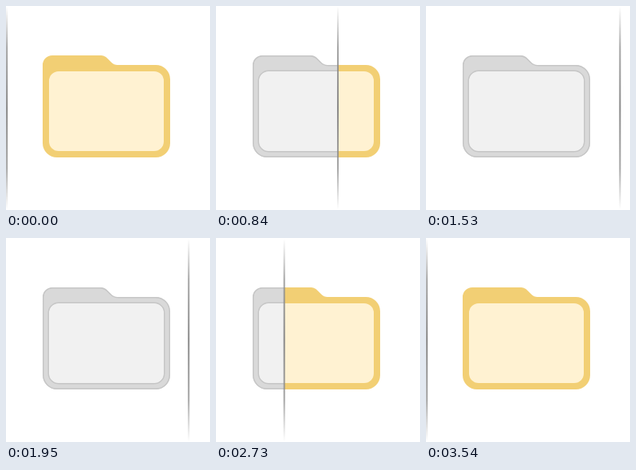
Animation of 256x256 px, one loop 3600 ms. Source, as an HTML page:

```html
<!DOCTYPE html>
<html lang="en">
<head>
<meta charset="utf-8">
<title>Folder wipe</title>
<style>
  @property --x {
    syntax: "<length>";
    inherits: true;
    initial-value: 1px;
  }
  html, body {
    margin: 0;
    width: 100%;
    height: 100%;
    overflow: hidden;
    background: #fff;
  }
  .stage {
    position: relative;
    width: 256px;
    height: 256px;
    animation: sweep 3600ms infinite;
  }
  svg {
    position: absolute;
    inset: 0;
    width: 256px;
    height: 256px;
  }
  .grey {
    background: #fff;
    clip-path: inset(0 calc(256px - var(--x)) 0 0);
  }
  .line { transform: translateX(var(--x)); }

  /* Linear start, soft landing in both directions */
  @keyframes sweep {
    0%      { --x: 1px;   animation-timing-function: cubic-bezier(.167, .167, .667, 1); }
    50%     { --x: 255px; animation-timing-function: cubic-bezier(.167, .167, .667, 1); }
    99.167% { --x: 1px; }
    100%    { --x: 1px; }
  }
</style>
</head>
<body>
<div class="stage">
  <svg viewBox="0 0 256 256">
    <defs>
      <path id="folder" d="M46 74a12 12 0 0 1 12-12H118c4.500 0 6.500 1 9.500 4l4 4c3 3 5 4 9.500 4H188a18 18 0 0 1 18 18V172a18 18 0 0 1-18 18H64a18 18 0 0 1-18-18Z"/>
      <clipPath id="edge"><use href="#folder"/></clipPath>
      <linearGradient id="fade" x2="0" y2="1">
        <stop offset="0" stop-color="#888" stop-opacity="0"/>
        <stop offset=".2" stop-color="#888" stop-opacity=".75"/>
        <stop offset=".5" stop-color="#888"/>
        <stop offset=".8" stop-color="#888" stop-opacity=".75"/>
        <stop offset="1" stop-color="#888" stop-opacity="0"/>
      </linearGradient>
    </defs>
    <use href="#folder" fill="#f2cf74"/>
    <rect x="54" y="82" width="144" height="100" rx="12" fill="#fff2d2"/>
  </svg>
  <svg class="grey" viewBox="0 0 256 256">
    <use href="#folder" fill="#d9d9d9" stroke="#c6c6c6" stroke-width="3" clip-path="url(#edge)"/>
    <rect x="53.250" y="81.250" width="145.500" height="101.500" rx="12.750" fill="#f1f1f1" stroke="#c6c6c6" stroke-width="1.500"/>
  </svg>
  <svg viewBox="0 0 256 256">
    <rect class="line" x="-1" y="1" width="2" height="254" fill="url(#fade)"/>
  </svg>
</div>
</body>
</html>
```
